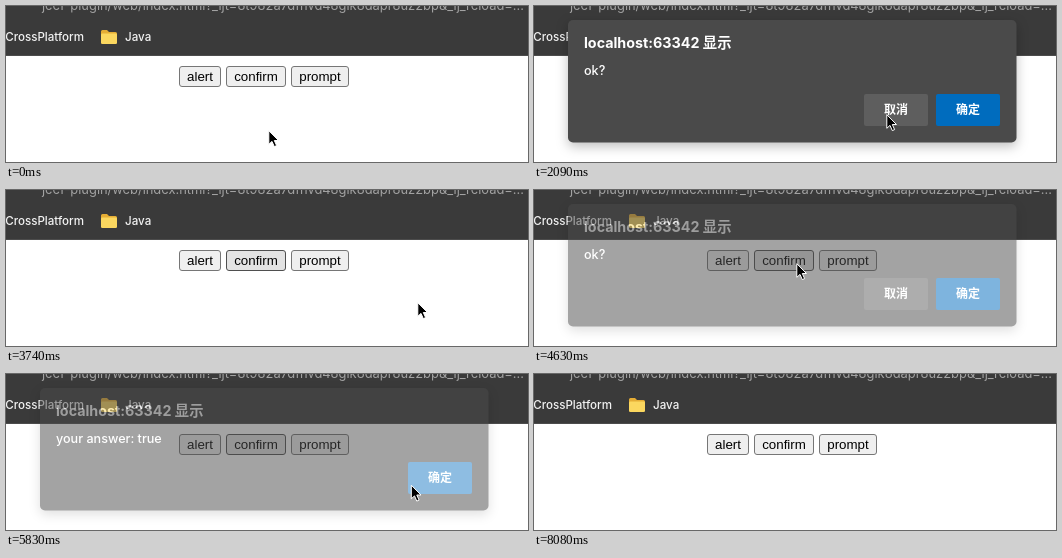
These frames come from a looping animation (522x156 px, 8230 ms). An HTML page:

```html
<!DOCTYPE html>
<html lang="en">
<head>
<meta charset="utf-8">
<title>Confirm dialog</title>
<style>
  html, body { margin: 0; width: 100%; height: 100%; overflow: hidden; background: #fff; }
  svg { display: block; width: 100vw; height: 100vh; }
  text { font-family: Inter, "Noto Sans CJK SC", "Noto Sans CJK", sans-serif; fill: #fff; white-space: pre; }
  .mark { font-size: 11.6px; font-weight: 500; fill: #f2f2f2; }
  .url { font-size: 12.9px; fill: #a2a2a2; }
  .btn rect { fill: #efefef; stroke: #767676; }
  .btn text { font: 13.333px "Liberation Sans", Arial, sans-serif; fill: #000; text-anchor: middle; }
  .btn.hot rect { fill: #e3e3e3; stroke: #4f4f4f; }
  #dialog { filter: drop-shadow(0 4px 6px rgba(0, 0, 0, .25)); }
  .title { font-size: 14.3px; font-weight: 700; }
  .msg { font-size: 12.6px; font-weight: 500; }
  .act { font-size: 12px; font-weight: 700; text-anchor: middle; }
</style>
</head>
<body>
<svg viewBox="0 0 522 156">
  <rect width="522" height="156" fill="#fff"/>
  <rect width="522" height="50" fill="#3a3a3a"/>
  <rect y="49" width="522" height="1" fill="#4c4c4c"/>
  <text class="url" x="36" y="4">jcef-plugin/web/index.html?_ijt=8t982a7dfhvd48glk8dapr8uz2bp&amp;_ij_reload=...</text>
  <text class="mark" x="78" y="35" text-anchor="end">CrossPlatform</text>
  <path d="M95 25.5q0-1.5 1.5-1.5h4.5l2 2h6.5q1.5 0 1.5 1.5v5H95z" fill="#e5ad35"/>
  <rect x="95" y="27.5" width="16" height="10.5" rx="1.3" fill="#fbd75f"/>
  <text class="mark" x="119" y="35">Java</text>

  <g id="page"></g>

  <g id="dialog">
    <rect x="34" y="14" width="448.5" height="122.5" rx="5" fill="#4a4a4a"/>
    <text class="title" x="50" y="42">localhost:63342 显示</text>
    <text class="msg" id="msg" x="50" y="69"></text>
    <g id="cancel">
      <rect x="330" y="88" width="64" height="32" rx="2" fill="#5e5e5e"/>
      <text class="act" x="362" y="108.3">取消</text>
    </g>
    <rect x="402" y="88" width="64" height="32" rx="2" fill="#006cbe"/>
    <rect id="glow" x="402" y="88" width="64" height="32" rx="2" fill="#fff"/>
    <text class="act" x="434" y="108.3">确定</text>
  </g>

  <path id="cursor" d="M.8 .7V14.3L4 11.4l2.3 5.2 2.3-1-2.3-5.1h4.2z"
        fill="#000" stroke="#fff" stroke-width="1" stroke-linejoin="round"/>
</svg>
<script>
const LOOP = 8230, BEAT = 150;
const HOME = { x: 262, y: 124 };
const el = id => document.getElementById(id);

// Cursor glides: last still beat, number of beats, goal
const glides = [
  [290, 3, 256, 76],     // to confirm
  [1640, 3, 352, 108],   // to cancel
  [2990, 3, 411, 112],   // to ok
  [3740, 2, 290, 84],    // back up
  [4040, 2, 262, 73],    // to confirm
  [4780, 4, 412, 109],   // to ok
  [5680, 2, 397, 112],   // drift aside
  [6280, 4, 414.5, 105], // to ok
  [7630, 3, 474, 162]    // off the stage
];

// open, close, message
const dialogs = [
  [1040, 2390, "ok?"],
  [2390, 3590, "your answer: false"],
  [4630, 5680, "ok?"],
  [5830, 7330, "your answer: true"]
];

const buttons = [["alert", 173, 42], ["confirm", 220, 60], ["prompt", 285, 58]];
el("page").innerHTML = buttons.map(([label, x, w]) =>
  `<g class="btn" id="${label}">
    <rect x="${x + .5}" y="60.5" width="${w - 1}" height="20" rx="2.5"/>
    <text x="${x + w / 2}" y="75">${label}</text>
  </g>`).join("");

const clamp = v => Math.min(1, Math.max(0, v));
const smooth = p => p * p * (3 - 2 * p);
const between = (t, a, b) => t >= a && t < b;

// The picture only changes on beats; the beat restarts with the second round.
function snap(t) {
  const origin = t < 4630 ? 440 : 4630;
  return origin + BEAT * Math.floor((t - origin) / BEAT);
}

function cursorAt(t) {
  return glides.reduce(({ x, y }, [from, beats, gx, gy]) => {
    const p = smooth(clamp((t - from) / (beats * BEAT)));
    return { x: x + (gx - x) * p, y: y + (gy - y) * p };
  }, HOME);
}

function overOk(t) {
  const { x, y } = cursorAt(t);
  return x > 402 && x < 466 && y > 88 && y < 120;
}

function dialogAt(t) {
  const open = dialogs.findLast(d => d[0] <= t);
  if (!open) return { alpha: 0, msg: "" };
  const [from, to, msg] = open;
  const rise = clamp((t - from + BEAT) / (2 * BEAT));
  const fall = clamp((to + BEAT - t) / (2 * BEAT));
  return { alpha: Math.min(rise, fall), msg };
}

function draw(time) {
  const t = snap(time);
  const { x, y } = cursorAt(t);
  const { alpha, msg } = dialogAt(t);
  const heat = overOk(t) + overOk(t - BEAT);
  el("cursor").setAttribute("transform", `translate(${x} ${y})`);
  el("dialog").style.opacity = alpha;
  el("msg").textContent = msg;
  el("cancel").style.display = msg === "ok?" ? "" : "none";
  el("glow").style.opacity = heat * .06;
  el("confirm").classList.toggle("hot", between(t, 740, 3890) || between(t, 4190, 7330));
}

const start = performance.now();
function tick() {
  draw((performance.now() - start) % LOOP);
  requestAnimationFrame(tick);
}
tick();
</script>
</body>
</html>
```
